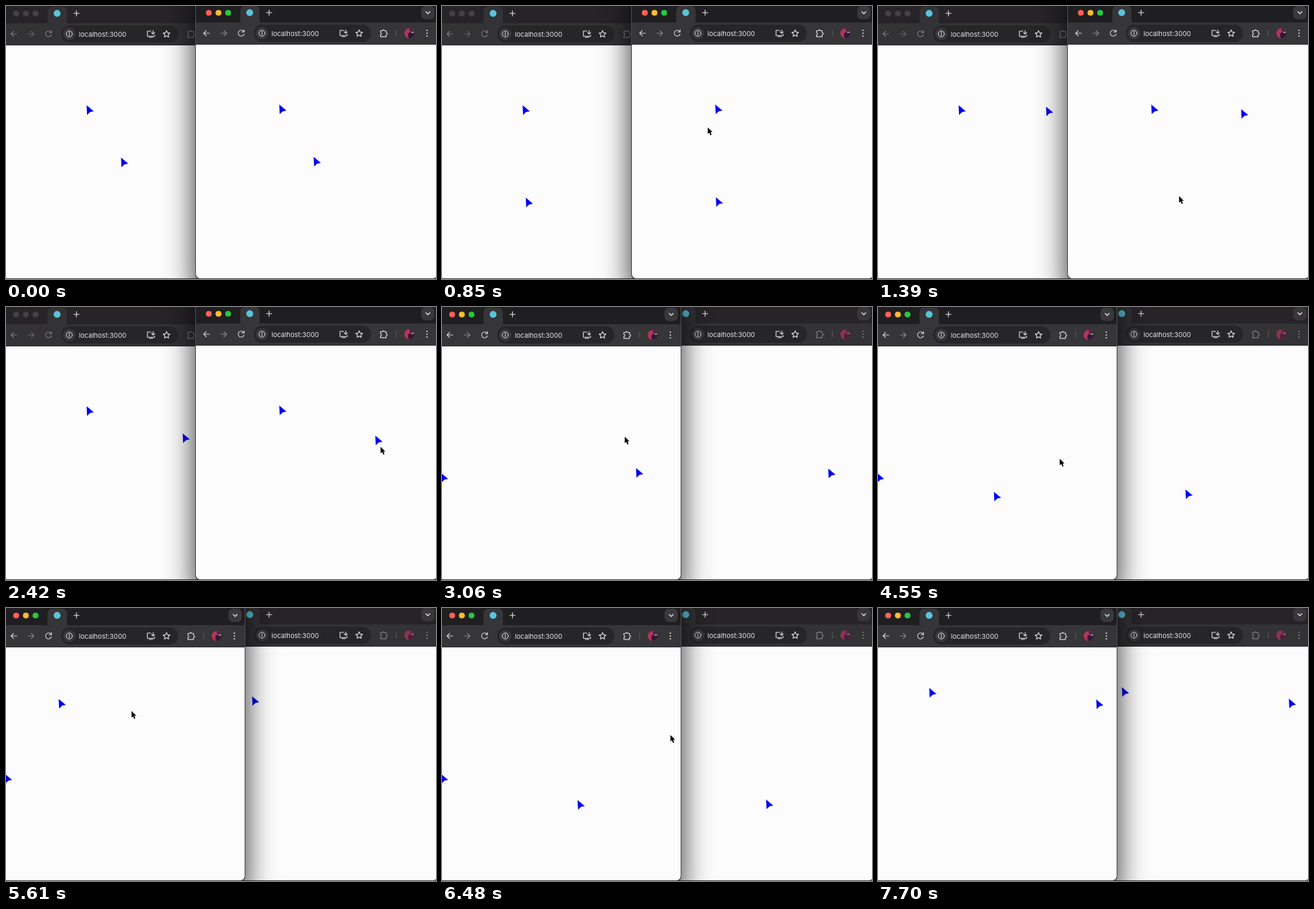
An HTML page with a canvas for the animation above (7850 ms loop, 600 by 381 pixels).

```html
<!DOCTYPE html>
<html lang="en">
<head>
<meta charset="utf-8">
<title>Shared cursors</title>
<style>
html, body { margin: 0; width: 100%; height: 100%; overflow: hidden; background: #666 }
canvas { display: block }
</style>
</head>
<body>
<canvas id="stage" width="600" height="381"></canvas>
<script>
const ctx = document.getElementById('stage').getContext('2d');
const { PI, sin, cos } = Math;
const LOOP = 7850, LAG = 300, STEP = 10, BULGE = .75;
const OFFSET = 268.8;
const LEAVE_RIGHT = 2720, FOCUS_LEFT = 3000, LEAVE_LEFT = 6560, ENTER_RIGHT = 6600;

// Turning points of the circling hand: time, x, y
const turns = [
  [300, 429, 211], [690, 345, 250], [1090, 506, 144], [1390, 413, 251],
  [1650, 330, 170], [2120, 515, 180], [2420, 515, 180], [LEAVE_RIGHT, 267, 231],
  [3460, 169, 168], [3760, 248, 198], [4250, 161, 257], [4550, 246, 198],
  [5310, 73, 126], [5610, 168, 130], [6000, 110, 230],
  [LEAVE_LEFT, 304, 127], [ENTER_RIGHT, 340, 111], [6800, 370, -40]
];

// Half an ellipse from each turning point to the next
function hand(t) {
  const next = turns.findIndex(p => p[0] > t);
  if (next < 1) return (next ? turns[turns.length - 1] : turns[0]).slice(1);
  const [t0, x0, y0] = turns[next - 1], [t1, x1, y1] = turns[next];
  const angle = PI * (t - t0) / (t1 - t0);
  const dx = (x0 - x1) / 2, dy = (y0 - y1) / 2;
  const side = BULGE * sin(angle) * (t < LEAVE_RIGHT ? 1 : -1);
  return [
    (x0 + x1) / 2 + dx * cos(angle) - dy * side,
    (y0 + y1) / 2 + dy * cos(angle) + dx * side
  ];
}

// Positions each window last reported, in left window coordinates
function rightClient(t) {
  const [x, y] = hand(t >= ENTER_RIGHT ? ENTER_RIGHT : Math.min(t, LEAVE_RIGHT));
  return [x - 269, y];
}
function leftClient(t) {
  return t < LEAVE_RIGHT ? [112, 138] : hand(Math.min(t, LEAVE_LEFT));
}

function box(x, y, w, h, color, r = 0) {
  ctx.fillStyle = color;
  ctx.beginPath();
  ctx.roundRect(x, y, w, h, r);
  ctx.fill();
}
function dot(x, y, r, color) { box(x - r, y - r, 2 * r, 2 * r, color, r); }
function stroke(d, color, width = 1.1) {
  ctx.strokeStyle = color;
  ctx.lineWidth = width;
  ctx.stroke(new Path2D(d));
}
function at(x, y, draw) {
  ctx.save();
  ctx.translate(x, y);
  draw();
  ctx.restore();
}

// Icons are centred on the given point
function arrow(x, y, dir, color) {
  at(x, y, () => {
    ctx.scale(dir, 1);
    stroke('M-4 0H4M.3-3.7 4 0 .3 3.7', color);
  });
}
function reload(x, y, color) {
  at(x, y, () => stroke('M3.4-2.6A4.1 4.1 0 1 0 4 1.2M4.2-4.6V-1.7H1.2', color));
}
function info(x, y, color) {
  dot(x, y, 8.6, '#38373a');
  at(x, y, () => stroke('M4.2 0A4.2 4.2 0 1 1-4.2 0 4.2 4.2 0 1 1 4.2 0M0-.5V2.2M0-2.6V-1.6', color, 1));
}
function install(x, y, color) {
  at(x, y, () => stroke('M0-4H-5V3.3H5V1.5M-2.5 4.8H2.5M3-4.8V0M.8-1.9 3 .2 5.2-1.9', color));
}
function star(x, y, color) {
  let d = '';
  for (let k = 0; k < 10; k++) {
    const r = k % 2 ? 2.4 : 5, a = k * PI / 5;
    d += (k ? 'L' : 'M') + (x + r * sin(a)) + ' ' + (y - r * cos(a));
  }
  stroke(d + 'Z', color);
}
function puzzle(x, y, color) {
  at(x, y, () => stroke('M-4-3.5H-1.5A1.6 1.6 0 0 1 1.5-3.5H3.8V-1A1.6 1.6 0 0 1 3.8 2.2V4.8H-4V2.3A1.7 1.7 0 0 0-4-1Z', color, 1.2));
}
function avatar(x, y, alpha) {
  at(x, y, () => {
    ctx.globalAlpha = alpha;
    ctx.beginPath();
    ctx.arc(0, 0, 7, 0, 2 * PI);
    ctx.clip();
    box(-7, -7, 14, 14, '#b5345a');
    dot(3.5, 3, 5.5, '#2e1b35');
    dot(4, -6, 4, '#4a2444');
    box(2.5, -2, 3.5, 1.5, '#b9a2b8');
  });
}

function browser(active, top, cursors) {
  const bright = '#dcdcde', button = active ? '#d0d0d2' : '#79787b';
  const toolbar = active ? '#363537' : '#333234', y = 39;
  ctx.save();
  ctx.shadowColor = active ? 'rgba(0,0,0,.82)' : 'transparent';
  ctx.shadowBlur = 42;
  ctx.shadowOffsetY = 25;
  box(-4.8, -40, 338.8, 421 - top, '#4c4c4e', 6);
  ctx.restore();

  ctx.save();
  ctx.beginPath();
  ctx.roundRect(-3.8, -40, 336.8, 420 - top, 6);
  ctx.clip();
  box(-4, -2, 340, 28, active ? '#1f1e21' : '#262428');
  box(-4, 24, 340, 31, toolbar);
  box(-4, 55, 340, 330, '#fdfcfd');

  box(58, 1, 27, 30, toolbar, 6);
  const lights = active ? ['#ff5f57', '#febc2e', '#28c840'] : Array(3).fill('#434145');
  lights.forEach((color, i) => dot(14.2 + i * 13.5, 10.5, 4.1, color));
  dot(71.3, 10.3, 4.8, '#58c4dc');
  stroke('M94.7 10.3H102M98.3 6.6V14', bright);
  box(310.5, 1, 18.5, 18.5, active ? '#39383b' : '#38363a', 6);
  stroke('M317 9 319.8 11.7 322.6 9', bright, 1.3);

  arrow(11, y, -1, button);
  arrow(35, y, 1, active ? '#858487' : '#646366');
  reload(59.3, y, button);
  box(77, 27, 163.5, 24, '#262528', 12);
  info(88.3, y, bright);
  ctx.fillStyle = '#e6e6e8';
  ctx.font = '9.4px Inter, sans-serif';
  ctx.fillText('localhost:3000', 101.7, 42.5);
  install(202.3, y, bright);
  star(224, y + .3, bright);
  puzzle(257.8, y, button);
  box(275.3, 34.5, 1, 9, '#5b5a5d');
  avatar(294, y, active ? 1 : .7);
  for (const dy of [-4, 0, 4]) dot(318.6, y + dy, 1.1, button);

  ctx.fillStyle = '#0000f0';
  const pointer = new Path2D('M0 0 10 8.4 4.8 9.4 .6 13.4Z');
  for (const [cx, cy] of cursors) at(cx + .5, cy + .6, () => ctx.fill(pointer));
  ctx.restore();
}

function mouse(x, y) {
  const d = 'M0 0V9.2L2.1 7.3 3.7 11 5.4 10.2 3.8 6.7H6.6Z';
  at(x, y, () => {
    stroke(d, '#fff', 1.6);
    ctx.fillStyle = '#000';
    ctx.fill(new Path2D(d));
  });
}

function frame(now) {
  const t = now % LOOP, leftActive = t >= FOCUS_LEFT;
  const drawWindow = (x, top, active) => {
    // The window in use shows the newer position
    const seen = t - LAG - (active ? 0 : STEP);
    at(x, top, () => browser(active, top, [leftClient(seen), rightClient(seen)]));
  };
  const left = () => drawWindow(0, 0, leftActive);
  const right = () => drawWindow(OFFSET, -1, !leftActive);

  ctx.fillStyle = '#666';
  ctx.fillRect(0, 0, 600, 381);
  ctx.lineCap = ctx.lineJoin = 'round';
  for (const draw of leftActive ? [right, left] : [left, right]) draw();

  if (t >= 270 && t < 6800) {
    const [x, y] = hand(t);
    mouse(x + 7.5, y + 14);
  }
  requestAnimationFrame(() => frame(performance.now()));
}
frame(0);
</script>
</body>
</html>
```
